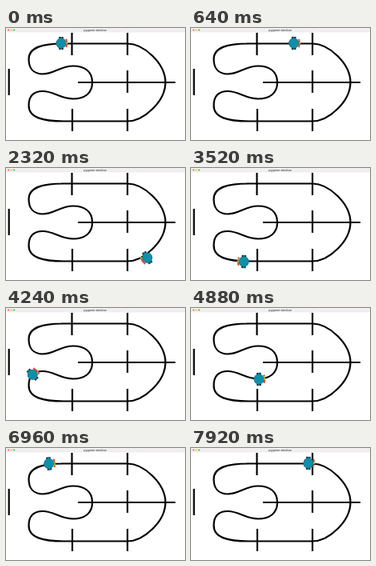
An HTML page with a canvas that plays this animation: 224x140 px, repeating every 8 s.

```html
<!DOCTYPE html>
<html lang="en">
<head>
<meta charset="utf-8">
<title>Line follower</title>
<style>
html, body { margin: 0; width: 100%; height: 100%; overflow: hidden; background: #fff; }
canvas { display: block; width: 224px; height: 140px; }
</style>
</head>
<body>
<canvas id="stage"></canvas>
<script>
const W = 224, H = 140, LOOP = 8000, STEP = 80;
const canvas = document.getElementById('stage');
const scale = window.devicePixelRatio || 1;
canvas.width = W * scale;
canvas.height = H * scale;
const ctx = canvas.getContext('2d');

const TRACK = 'M69 19.5H152C172 19.5 199.5 44 199.5 68C199.5 92 172 116.5 152 116.5' +
  'H72C46 116.5 28.5 112 28.5 97C28.5 86 34 79 46 79C60 79 68 88.5 84 88.5' +
  'C98 88.5 108 82 108 68C108 54 98 47.5 84 47.5C68 47.5 60 57.5 46 57.5' +
  'C34 57.5 28.5 50 28.5 39C28.5 24 46 19.5 72 19.5Z';
const BARS = 'M82.5 6V34M152 6V34M152 53V81M83 101V129M152 101V129M3.7 51V84M90 68H212';
const trackShape = new Path2D(TRACK);
const barShape = new Path2D(BARS);

const route = document.createElementNS('http://www.w3.org/2000/svg', 'path');
route.setAttribute('d', TRACK);
const total = route.getTotalLength();

function onRoute(d) {
  const p = route.getPointAtLength(d % total);
  const q = route.getPointAtLength((d + 0.5) % total);
  const a = Math.atan2(q.y - p.y, q.x - p.x);
  return { x: p.x, y: p.y, nx: -Math.sin(a), ny: Math.cos(a) };
}

// Time, x, y of the robot; each is turned into distance and sideways drift.
let from = 0;
const keys = [
  [0, 69, 19], [880, 151, 19], [1280, 184, 33], [1760, 202, 69],
  [2320, 177, 112], [2640, 147, 118.5], [3520, 66, 117], [4400, 46, 79],
  [4880, 85, 89], [5280, 109, 69], [6160, 40, 59], [6960, 54, 19.5],
  [7920, 147, 19]
].map(([t, x, y]) => {
  let best = Infinity, key;
  const start = from;
  for (let d = start; d < start + 150; d += 0.5) {
    const p = onRoute(d);
    const gap = Math.hypot(x - p.x, y - p.y);
    if (gap < best) {
      best = gap;
      from = d;
      key = { t, d, drift: (x - p.x) * p.nx + (y - p.y) * p.ny };
    }
  }
  return key;
});

function place(t) {
  let i = 1;
  while (i < keys.length - 1 && keys[i].t < t) i++;
  const a = keys[i - 1], b = keys[i];
  const u = (t - a.t) / (b.t - a.t);
  const c = Math.max(0, Math.min(1, u));
  const drift = a.drift + (b.drift - a.drift) * c * c * (3 - 2 * c);
  const p = onRoute(a.d + (b.d - a.d) * u + total);
  return { x: p.x + p.nx * drift, y: p.y + p.ny * drift };
}

function dot(x, y, r, color) {
  ctx.fillStyle = color;
  ctx.beginPath();
  ctx.arc(x, y, r, 0, Math.PI * 2);
  ctx.fill();
}

function overLine(x, y) {
  ctx.save();
  ctx.setTransform(1, 0, 0, 1, 0, 0);
  ctx.lineWidth = 3;
  const hit = ctx.isPointInStroke(trackShape, x, y) || ctx.isPointInStroke(barShape, x, y);
  ctx.restore();
  return hit;
}

function drawWindow() {
  ctx.fillStyle = '#fff';
  ctx.fillRect(0, 0, W, H);
  ctx.fillStyle = '#f1efef';
  ctx.fillRect(0, 0, W, 5);
  ctx.fillStyle = '#dedcdc';
  ctx.fillRect(0, 4.8, W, 0.4);
  ['#fb5f57', '#fcbc2f', '#2bc840'].forEach((c, i) => dot(3.2 + i * 3.4, 2.5, 1.1, c));
  ctx.fillStyle = '#555';
  ctx.font = '600 3.6px Inter, "Open Sans", sans-serif';
  ctx.textAlign = 'center';
  ctx.textBaseline = 'middle';
  ctx.fillText('pygame window', 111.5, 2.6);
}

function drawTrack() {
  ctx.strokeStyle = '#000';
  ctx.lineWidth = 2.2;
  ctx.stroke(trackShape);
  ctx.stroke(barShape);
}

function drawRobot(t) {
  const p = place(t), q = place(t + 90), r = place(t - 90);
  const angle = Math.atan2(q.y - r.y, q.x - r.x);
  const cos = Math.cos(angle), sin = Math.sin(angle);
  ctx.save();
  ctx.translate(p.x, p.y);
  ctx.rotate(angle);
  for (const side of [-1, 1]) {
    ctx.fillStyle = '#17343b';
    ctx.fillRect(-2.8, side * 7 - 1.1, 5.6, 2.2);
    ctx.fillStyle = '#138ba3';
    ctx.fillRect(-1, side * 7.2 - 0.9, 2, 1.8);
  }
  dot(0, 0, 6.5, '#176474');
  dot(0, 0, 6, '#108fa9');
  for (let i = -2; i <= 2; i++) {
    const x = 7.3 - Math.abs(i) * 0.35, y = i * 2.1;
    const hit = overLine(p.x + x * cos - y * sin, p.y + x * sin + y * cos);
    dot(x, y, 1.15, hit ? '#e8d62c' : '#d8382e');
    if (hit) dot(x, y, 0.75, '#35bd3b');
  }
  ctx.restore();
}

function draw(now) {
  const t = Math.floor((now % LOOP) / STEP) * STEP;
  ctx.setTransform(scale, 0, 0, scale, 0, 0);
  drawWindow();
  drawTrack();
  drawRobot(t);
  requestAnimationFrame(draw);
}
requestAnimationFrame(draw);
</script>
</body>
</html>
```
